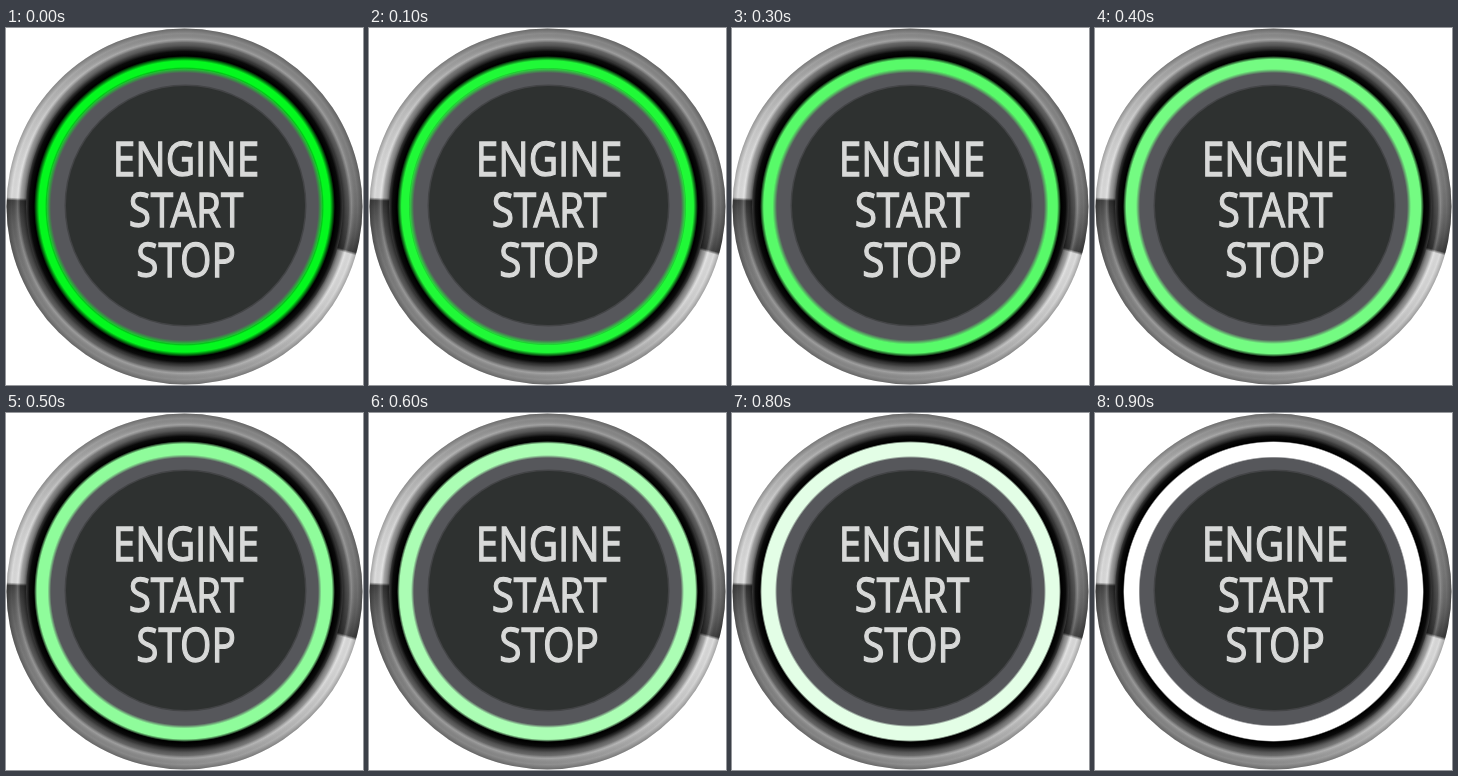
Write an HTML page with a canvas that moves like this. It is 357 by 357 pixels and loops after 1 s.

```html
<!DOCTYPE html>
<html lang="en">
<head>
<meta charset="utf-8">
<title>Engine button</title>
<style>
  html, body { margin: 0; width: 100%; height: 100%; overflow: hidden; background: #fff; }
  canvas { display: block; }
</style>
</head>
<body>
<canvas id="stage" width="357" height="357"></canvas>
<script>
const ctx = document.getElementById('stage').getContext('2d');
const LOOP = 1000, STEPS = 10, TAU = Math.PI * 2, C = 178.5;
const GLINTS = [16, 183]; // degrees, clockwise from the right

function disc(r, fill, x = C, y = C) {
  ctx.beginPath();
  ctx.arc(x, y, r, 0, TAU);
  ctx.fillStyle = fill;
  ctx.fill();
}

// Radial gradient from [radius, colour] pairs
function radial(...stops) {
  const from = stops[0][0], to = stops[stops.length - 1][0];
  const g = ctx.createRadialGradient(C, C, from, C, C, to);
  for (const [r, color] of stops) g.addColorStop((r - from) / (to - from), color);
  return g;
}

// Each glint has a hard edge: bright after it, dark before it
function shine(deg) {
  return GLINTS.reduce((v, edge) => {
    const d = (deg - edge + 540) % 360 - 180;
    return v + (d >= 0 ? 85 * Math.exp(-((d / 48) ** 2)) : -75 * Math.exp(d / 15));
  }, 135);
}

function metal() {
  const g = ctx.createConicGradient(0, C, C);
  for (let deg = 0; deg <= 360; deg++) {
    const v = Math.round(shine(deg));
    g.addColorStop(deg / 360, `rgb(${v},${v},${v})`);
  }
  return g;
}

function bezel() {
  disc(178, metal());
  disc(178, radial(
    [157, 'rgba(0,0,0,.75)'], [161, 'rgba(0,0,0,.4)'], [164, 'rgba(0,0,0,.25)'],
    [167, 'rgba(255,255,255,.18)'], [173, 'rgba(0,0,0,0)'], [178, 'rgba(0,0,0,.25)']
  ));
  disc(158.5, radial([151, '#000'], [155, '#0a0a0a'], [158.5, '#3a3a3a']));
}

// k: 0 = green, 1 = white
function light(k) {
  const mix = a => Math.round(a + (255 - a) * k);
  const rgb = `${mix(4)},${mix(248)},${mix(30)}`;
  const core = `rgb(${rgb})`, clear = `rgba(${rgb},0)`;
  disc(138, '#56575b');
  disc(150.5, radial(
    [133.5, clear], [139.5 - 4.5 * k, core], [145.5 + 3.5 * k, core], [150.5, clear]
  ));
}

function face() {
  disc(121, '#434446', 179.5, 177.5);
  disc(119.5, '#2e3130', 179.5, 177.5);
  ctx.save();
  ctx.translate(180, 148);
  ctx.scale(0.86, 1); // condensed lettering
  ctx.font = '47px "Open Sans", "Noto Sans", sans-serif';
  ctx.textAlign = 'center';
  ctx.fillStyle = ctx.strokeStyle = '#d8d9d8';
  ctx.lineWidth = 1.3;
  ['ENGINE', 'START', 'STOP'].forEach((word, i) => {
    ctx.fillText(word, 0, i * 50.5);
    ctx.strokeText(word, 0, i * 50.5);
  });
  ctx.restore();
}

function draw(now) {
  const step = Math.floor((now % LOOP) / LOOP * STEPS);
  ctx.clearRect(0, 0, 357, 357);
  bezel();
  light(step / (STEPS - 1));
  face();
  requestAnimationFrame(draw);
}
requestAnimationFrame(draw);
</script>
</body>
</html>
```
